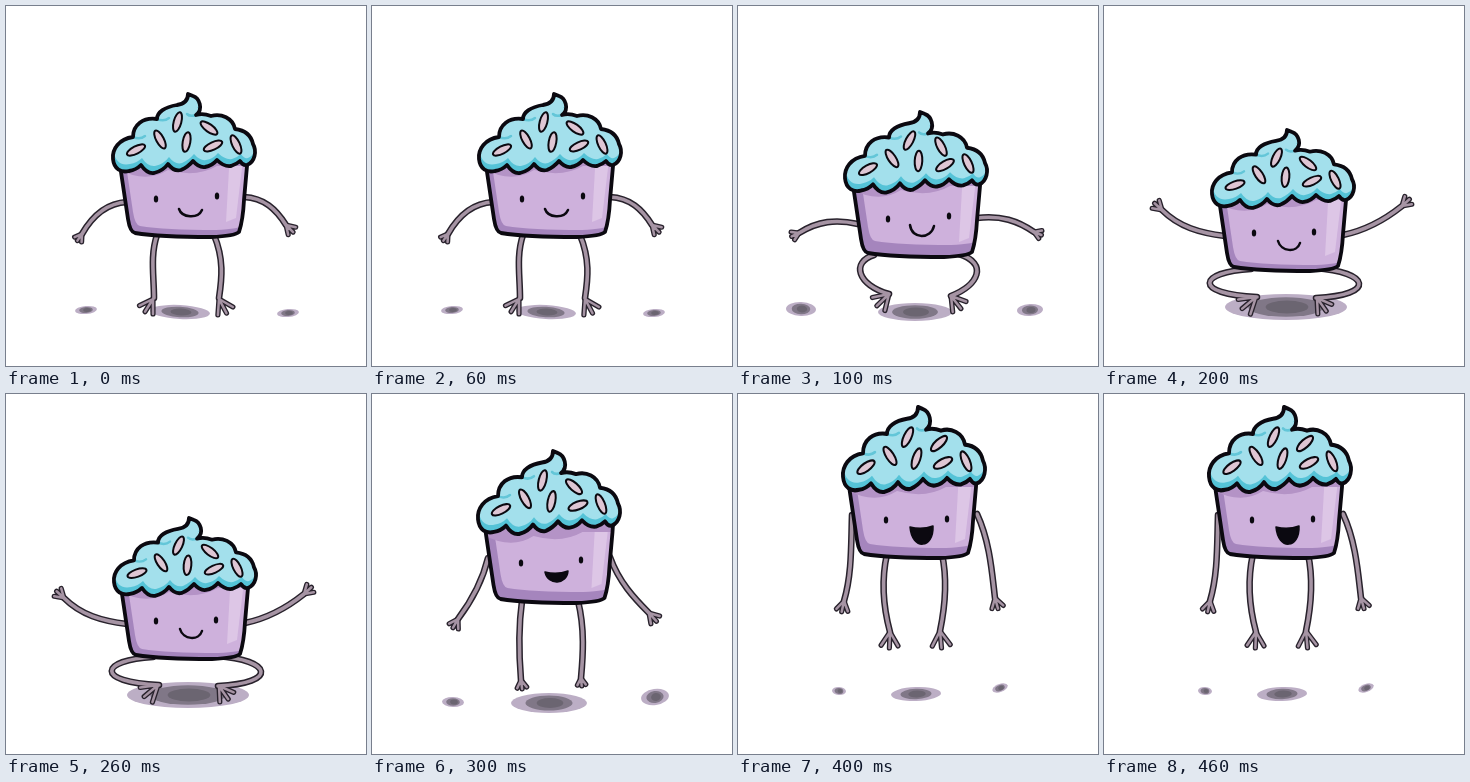
An HTML page for the animation above (500 ms loop, 360 by 360 pixels).

```html
<!DOCTYPE html>
<html lang="en">
<head>
<meta charset="utf-8">
<title>Jumping cupcake</title>
<style>
html, body { margin: 0; width: 100%; height: 100%; overflow: hidden; background: #fff; }
svg { display: block; width: 100vw; height: 100vh; }
</style>
</head>
<body>
<svg id="stage" viewBox="0 0 360 360"></svg>
<script>
const INK = '#0b0910', STEP = 100;

const FROST = 'M182 88C182 94 178 98 171 99C159 101 151 106 151 113C137 111 127 119 127 131C113 133 106 143 107 153C108 163 115 167 123 165Q130 164 135 159Q141 168 148 167Q157 165 162 158Q168 166 175 164Q182 161 187 155Q193 162 199 161Q206 160 211 154Q218 161 225 160Q231 158 234 155Q237 160 241 159C249 156 251 145 247 138C245 129 238 124 229 123C227 112 215 107 205 110Q197 107 190 109C198 103 193 92 187 90Z';
const CUP = 'M112 145L115 166L122 213Q124 226 129 227Q154 231 205 231Q229 230 233 226Q237 214 238 194L241 160L242 145Z';
const SPRINKLES = [[130, 144], [154, 133.5], [171.5, 116], [180.5, 136], [203, 122], [207, 140], [230, 138.5]];

// frost: [dx, tip y, y scale]   cup: [dx, dy]   shadow: [x, y, rx, ry, tilt]
// limb: [path, hand x, hand y, finger direction, finger length]
const POSES = [
  {
    frost: [0, 88, 1], cup: [0, 0], shade: [5, -7], angles: [-27, 62, -75, -80, 36, -25, 65],
    eyes: [150, 193, 211, 190], smile: 'M173 203C176 212 192 213 196 204', open: false,
    limbs: [
      ['M121 196C103 197 88 207 76 228', 76, 228, 125, 8],
      ['M238 191C258 192 270 203 280 219', 280, 219, 45, 10],
      ['M151 229C144 250 148 270 148 292', 147, 293, 122, 15],
      ['M208 229C218 253 216 272 213 292', 213, 293, 62, 16]
    ],
    shadows: [[80, 304, 11, 4, -5], [174, 306, 30, 7, 3], [282, 307, 11, 4, -5]]
  },
  {
    frost: [0, 106, 1.02], cup: [1, 20], shade: [7, -12], angles: [-28, 56, -62, -87, 62, -30, 64],
    eyes: [150, 213, 211, 210], smile: 'M172 219C174 234 193 233 196 220', open: false,
    limbs: [
      ['M120 218C98 213 80 215 61 227', 61, 227, 155, 8],
      ['M239 212C263 209 280 215 296 226', 296, 226, 22, 8],
      ['M136 249C113 256 119 279 151 288', 151, 288, 136, 17],
      ['M221 248C251 258 240 279 213 290', 213, 290, 52, 16]
    ],
    shadows: [[63, 303, 15, 7, 2], [177, 306, 37, 9, 0], [292, 304, 13, 6, -3]]
  },
  {
    frost: [1, 124, .985], cup: [1, 34], shade: [6, -6], angles: [-20, 57, -65, -85, 38, -25, 64],
    eyes: [150, 227, 210, 226], smile: 'M174 235C177 246 193 247 196 237', open: false,
    limbs: [
      ['M121 230C96 227 75 221 58 204', 58, 204, 222, 10],
      ['M239 229C263 224 283 212 298 200', 298, 200, 318, 10],
      ['M147 263C94 266 88 288 153 291', 152, 291, 140, 18],
      ['M211 262C266 266 273 289 212 292', 213, 292, 55, 16]
    ],
    shadows: [[182, 301, 61, 13, 0]]
  },
  {
    frost: [-1, 57, 1.05], cup: [-.5, -22], shade: [7, -11], angles: [-25, 60, -75, -78, 40, -20, 66],
    eyes: [149, 169, 209, 166], smile: 'M173 178Q185 181 196 177C195 191 176 192 173 178Z', open: true,
    limbs: [
      ['M116 164C110 189 98 209 86 225', 86, 225, 120, 10],
      ['M238 163C247 188 262 204 277 219', 277, 219, 48, 11],
      ['M150 207C146 236 147 262 149 286', 149, 286, 83, 9],
      ['M206 207C213 235 211 262 209 284', 209, 284, 85, 8]
    ],
    shadows: [[81, 308, 11, 5, 2], [177, 309, 38, 10, 0], [283, 303, 14, 8, -8]]
  },
  {
    frost: [-2, 13, 1.075], cup: [-3, -67], shade: [6, -10], angles: [-33, 55, -63, -70, -40, -25, 65],
    eyes: [148, 126, 209, 125], smile: 'M172 133Q184 136 195 132C196 155 174 157 172 133Z', open: true,
    limbs: [
      ['M114 121C113 151 114 180 106 207', 106, 207, 102, 11],
      ['M239 120C252 148 254 179 257 204', 257, 204, 74, 11],
      ['M149 160C143 187 145 212 152 238', 152, 238, 92, 16],
      ['M204 160C210 188 207 213 202 237', 202, 237, 85, 17]
    ],
    shadows: [[101, 297, 7, 4, 5], [178, 300, 25, 7, -2], [262, 294, 8, 4, -20]]
  }
];

const path = (d, attrs) => `<path d="${d}" ${attrs}/>`;
const line = (d, color, width) =>
  path(d, `fill="none" stroke="${color}" stroke-width="${width}" stroke-linecap="round" stroke-linejoin="round"`);
const oval = (x, y, rx, ry, tilt, attrs) =>
  `<ellipse cx="${x}" cy="${y}" rx="${rx}" ry="${ry}" transform="rotate(${tilt} ${x} ${y})" ${attrs}/>`;

function shadow([x, y, rx, ry, tilt]) {
  return oval(x, y, rx, ry, tilt, 'fill="#bcaec5"') +
    oval(x, y, rx * .62, ry * .75, tilt, 'fill="#807787"') +
    oval(x + 1, y, rx * .35, ry * .5, tilt, 'fill="#6b6571"');
}

function limb([d, x, y, dir, len]) {
  const fingers = [-32, 0, 32].map(a => {
    const r = (dir + a) * Math.PI / 180;
    return `M${x} ${y}l${(len * Math.cos(r)).toFixed(1)} ${(len * Math.sin(r)).toFixed(1)}`;
  }).join('');
  return line(d, '#28222c', 6.6) + line(fingers, '#28222c', 5.2) +
    line(d, '#a694a4', 3.6) + line(fingers, '#a694a4', 2.5);
}

// A filled shape whose lit part is the same outline, shifted.
function solid(id, d, dark, light, [dx, dy], detail) {
  return `<clipPath id="${id}">${path(d, '')}</clipPath><g clip-path="url(#${id})">` +
    path(d, `fill="${dark}"`) + path(d, `fill="${light}" transform="translate(${dx} ${dy})"`) +
    detail + '</g>' + line(d, INK, 3.8);
}

function cup(p) {
  const detail = path('M224 145L220 216L230 212L238 145Z', 'fill="#ddc6e6"') +
    path('M112 163Q140 178 162 164Q190 172 211 160L242 160V145H112Z', 'fill="#b493c6"');
  return `<g transform="translate(${p.cup})">` +
    solid('cup', CUP, '#a585bd', '#ceb1dc', p.shade, detail) + '</g>';
}

function frosting(p) {
  const [dx, tip, scale] = p.frost;
  const swirl = line('M151 113Q158 116 163 112M127 131Q134 134 139 130M190 109Q184 111 181 108', '#63c6d8', 2.5);
  const bits = SPRINKLES.map(([x, y], i) =>
    oval(x, y, 10, 3.8, p.angles[i], `fill="#dec6d4" stroke="${INK}" stroke-width="2"`)).join('');
  return `<g transform="translate(${dx} ${tip}) scale(1 ${scale}) translate(0 -88)">` +
    solid('frost', FROST, '#55c3d7', '#a3e0ec', [1, -7], swirl) + bits + '</g>';
}

function face(p) {
  const [lx, ly, rx, ry] = p.eyes;
  const eye = (x, y) => oval(x, y, 2.2, 3.5, 0, `fill="${INK}"`);
  const mouth = p.open ? path(p.smile, `fill="${INK}" stroke="${INK}" stroke-width="1.5" stroke-linejoin="round"`)
    : line(p.smile, INK, 2.5);
  return eye(lx, ly) + eye(rx, ry) + mouth;
}

const stage = document.getElementById('stage');
const scenes = POSES.map(p =>
  p.shadows.map(shadow).join('') + p.limbs.map(limb).join('') + cup(p) + frosting(p) + face(p));

let shown = -1, start = null;
function draw(ms) {
  const i = Math.floor(ms / STEP) % scenes.length;
  if (i !== shown) stage.innerHTML = scenes[shown = i];
}
function tick(now) {
  if (start === null) start = now;
  draw(Math.max(0, now - start));
  requestAnimationFrame(tick);
}
draw(0);
requestAnimationFrame(tick);
</script>
</body>
</html>
```
